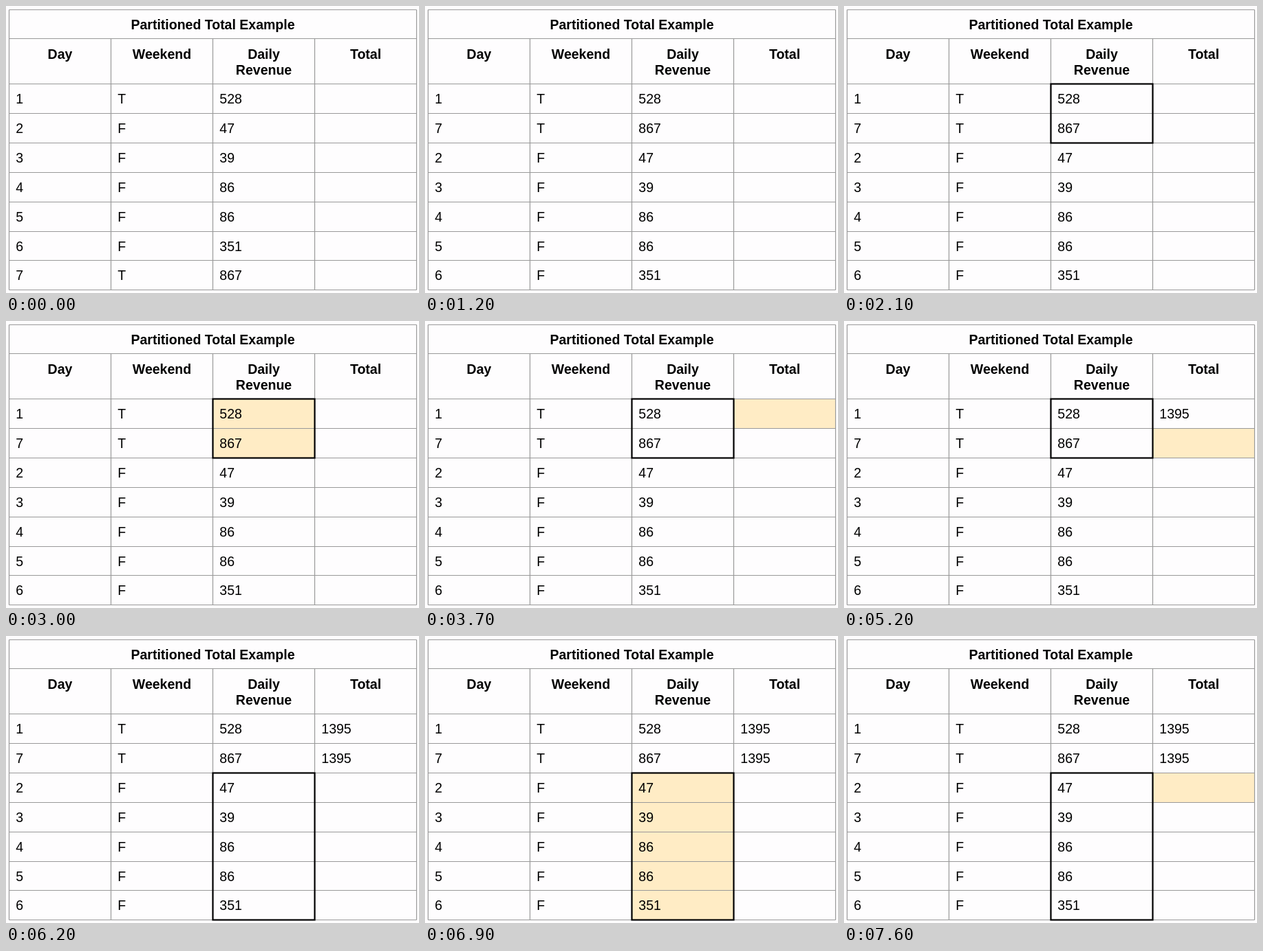
Write an HTML page with a canvas that moves like this. It is 600 px wide and 418 px high and loops after 8 s.

```html
<!DOCTYPE html>
<html lang="en">
<head>
<meta charset="utf-8">
<title>Partitioned Total Example</title>
<style>
  html, body { margin: 0; width: 100%; height: 100%; overflow: hidden; background: #fefdfe; }
  canvas { display: block; }
</style>
</head>
<body>
<canvas id="stage" width="600" height="418"></canvas>
<script>
const ctx = document.getElementById('stage').getContext('2d');
const LOOP = 8000;
const REVENUE = [528, 47, 39, 86, 86, 351, 867];
const BY_DAY = [1, 2, 3, 4, 5, 6, 7];
const BY_WEEKEND = [1, 7, 2, 3, 4, 5, 6];
const REVENUE_COL = 2, TOTAL_COL = 3;

// Each step overrides part of the state from its time on.
// frame: [first row, row count]; fill: [column, first row, row count]
const STEPS = [
  [0, { days: BY_DAY, frame: null, fill: null, totals: [] }],
  [1100, { days: BY_WEEKEND }],
  [1800, { frame: [0, 2] }],
  [2500, { fill: [REVENUE_COL, 0, 2] }],
  [3600, { fill: [TOTAL_COL, 0, 1] }],
  [4400, { fill: [TOTAL_COL, 1, 1], totals: [1395] }],
  [5700, { fill: null, totals: [1395, 1395] }],
  [6100, { frame: [2, 5] }],
  [6900, { fill: [REVENUE_COL, 2, 5] }],
  [7500, { fill: [TOTAL_COL, 2, 1] }],
];

const colX = i => 4.5 + 148 * i;
const rowY = i => Math.round(113 + 42.9 * i) + 0.5;

function text(value, x, y, bold) {
  ctx.font = `${bold ? 'bold ' : ''}19.5px "Liberation Sans", Arial, sans-serif`;
  ctx.textAlign = bold ? 'center' : 'left';
  ctx.fillText(value, x, y);
}

function line(x1, y1, x2, y2) {
  ctx.beginPath();
  ctx.moveTo(x1, y1);
  ctx.lineTo(x2, y2);
  ctx.stroke();
}

function drawGrid() {
  const top = 5.5, headTop = 47.5, bottom = rowY(7);
  ctx.strokeStyle = '#999';
  ctx.lineWidth = 1.2;
  for (let i = 0; i < 5; i++) line(colX(i), i % 4 ? headTop : top, colX(i), bottom);
  for (const y of [top, headTop]) line(colX(0), y, colX(4), y);
  for (let i = 0; i < 8; i++) line(colX(0), rowY(i), colX(4), rowY(i));
}

function drawHeadings() {
  text('Partitioned Total Example', 300.5, 34, true);
  ['Day', 'Weekend', 'Daily', 'Total'].forEach((name, i) => text(name, colX(i) + 74, 77, true));
  text('Revenue', colX(REVENUE_COL) + 74, 99.5, true);
}

function draw({ days, frame, fill, totals }) {
  ctx.fillStyle = '#fefdfe';
  ctx.fillRect(0, 0, 600, 418);
  if (fill) {
    const [col, row, count] = fill;
    ctx.fillStyle = '#ffecc5';
    ctx.fillRect(colX(col), rowY(row), 148, rowY(row + count) - rowY(row));
  }
  drawGrid();
  if (frame) {
    const [row, count] = frame;
    ctx.strokeStyle = '#000';
    ctx.lineWidth = 2.2;
    ctx.strokeRect(colX(REVENUE_COL), rowY(row), 148, rowY(row + count) - rowY(row));
  }
  ctx.fillStyle = '#000';
  drawHeadings();
  days.forEach((day, row) => {
    const weekend = day === 1 || day === 7 ? 'T' : 'F';
    [day, weekend, REVENUE[day - 1], totals[row] ?? ''].forEach((value, col) =>
      text(value, colX(col) + 9.8, 142.3 + 42.86 * row));
  });
}

function tick() {
  const time = performance.now() % LOOP;
  const reached = STEPS.filter(([start]) => start <= time).map(([, change]) => change);
  draw(Object.assign({}, ...reached));
  requestAnimationFrame(tick);
}
tick();
</script>
</body>
</html>
```
